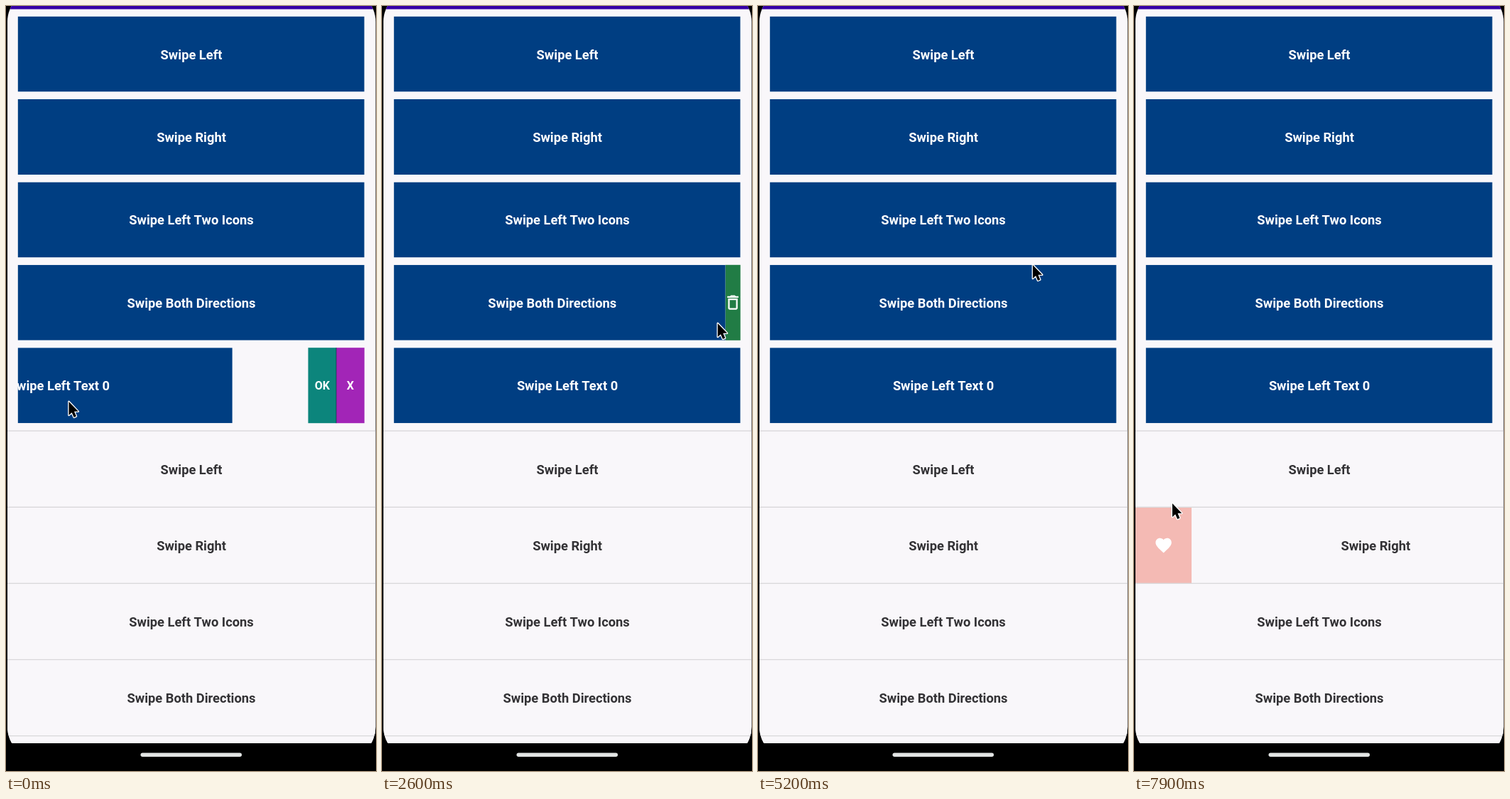
Write an HTML page with a canvas that moves like this. It is 521x1075 px and loops after 8 s.

```html
<!DOCTYPE html>
<html lang="en">
<head>
<meta charset="utf-8">
<title>Swipe rows</title>
<style>
html, body { margin: 0; width: 100%; height: 100%; overflow: hidden; background: #000; }
canvas { display: block; }
</style>
</head>
<body>
<canvas id="stage" width="521" height="1075"></canvas>
<script>
const ctx = document.getElementById('stage').getContext('2d');
const LOOP = 8000, STEP = 100;
const DRAG = 250, SETTLE = 300, CLOSE = 400, GROW_DELAY = 100;
const ACTION_WIDTH = 79.25, CENTER = 261, SCREEN_BOTTOM = 1036;
const PAPER = '#f9f7fa', BLUE = '#003e82', INK = '#333235';

const heartPath = new Path2D('M12 21.35l-1.45-1.32C5.4 15.36 2 12.28 2 8.5 2 5.42 4.42 3 7.5 3c1.74 0 3.41.81 4.5 2.09C13.09 3.81 14.76 3 16.5 3 19.58 3 22 5.42 22 8.5c0 3.78-3.4 6.86-8.55 11.54L12 21.35z');
const binPath = new Path2D('M6 19c0 1.1.9 2 2 2h8c1.1 0 2-.9 2-2V7H6v12zM8 9h8v10H8V9zm7.5-5l-1-1h-5l-1 1H5v2h14V4h-3.5z');
const arrowPath = new Path2D('M0 0V19L4.2 15.2L7.2 22L10.4 20.6L7.5 13.8H13.3Z');

const heart = { color: '#f4bab4', icon: heartPath };
const bin = { color: '#217c45', icon: binPath };
const ok = { color: '#0c857c', label: 'OK' };
const cross = { color: '#a225b7', label: 'X' };

const labels = ['Swipe Left', 'Swipe Right', 'Swipe Left Two Icons', 'Swipe Both Directions', 'Swipe Left Text 0'];
const CARDS = labels.length, ROWS = CARDS * 2;

// The pointer drags a row open from grip, then taps at rest to close it.
const swipes = [
  { row: 4, side: -1, actions: [ok, cross], open: -250, close: 786, overshoot: 0.174,
    grip: { x: 246, y: 555 }, rest: { x: 370, y: 543 } },
  { row: 3, side: 1, actions: [heart], open: 1500, close: 2000,
    grip: { x: 350, y: 440 }, rest: { x: 430, y: 440 } },
  { row: 3, side: -1, actions: [bin], open: 2515, close: 3100,
    grip: { x: 493, y: 445 }, rest: { x: 415, y: 440 } },
  { row: 2, side: -1, actions: [heart, bin], open: 3920, close: 4600,
    grip: { x: 410, y: 278 }, rest: { x: 409, y: 284 } },
  { row: 5, side: -1, actions: [bin], open: 5660, close: 6450,
    grip: { x: 304, y: 643 }, rest: { x: 225, y: 643 } },
  { row: 6, side: 1, actions: [heart], open: 7200, close: 7900,
    grip: { x: 200, y: 760 }, rest: { x: 53, y: 698 } }
];

for (const swipe of swipes) swipe.reach = swipe.side * swipe.actions.length * ACTION_WIDTH;

const stops = swipes.flatMap(({ open, close, grip, rest, reach }) => [
  { time: open, ...grip },
  { time: open + DRAG, x: grip.x + reach, y: grip.y },
  { time: close, ...rest },
  { time: close + CLOSE, ...rest }
]);

function ramp(time, start, duration) {
  const p = Math.min(1, Math.max(0, (time - start) / duration));
  return p * p * (3 - 2 * p);
}

function swipeShift({ open, close, reach, overshoot = 0 }, time) {
  const opened = ramp(time, open, DRAG) - ramp(time, close, CLOSE);
  const extra = overshoot * (1 - ramp(time, open + DRAG, SETTLE));
  return reach * opened * (1 + extra);
}

function pointerAt(time) {
  const next = stops.findIndex(stop => stop.time > time);
  const from = stops[next - 1], to = stops[next];
  const p = ramp(time, from.time, to.time - from.time);
  return [from.x + (to.x - from.x) * p, from.y + (to.y - from.y) * p];
}

function box(x, y, w, h, color) {
  ctx.fillStyle = color;
  ctx.fillRect(x, y, w, h);
}

function clipped(x, y, w, h, paint) {
  ctx.save();
  ctx.beginPath();
  ctx.rect(x, y, w, h);
  ctx.clip();
  paint();
  ctx.restore();
}

function drawLabel(text, x, middle, size, color) {
  ctx.font = `bold ${size}px Roboto, sans-serif`;
  ctx.textAlign = 'center';
  ctx.fillStyle = color;
  ctx.fillText(text, x, middle + size * 0.35);
}

function drawIcon(path, x, y) {
  ctx.save();
  ctx.translate(x, y);
  ctx.scale(1.12, 1.12);
  ctx.translate(-12, -12.1);
  ctx.fillStyle = '#fff';
  ctx.fill(path, 'evenodd');
  ctx.restore();
}

function drawActions(actions, x, y, width, height) {
  actions.forEach((action, i) => {
    const left = x + i * width, middle = y + height / 2;
    box(left, y, width, height, action.color);
    if (i) box(left - 0.5, y, 1, height, 'rgba(0, 30, 50, .6)');
    clipped(left, y, width, height, () => {
      if (action.icon) drawIcon(action.icon, left + width / 2, middle);
      else drawLabel(action.label, left + width / 2, middle + 0.5, 16, '#fff');
    });
  });
}

function drawRow(index, time) {
  const isCard = index < CARDS;
  const left = isCard ? 16.8 : 2, right = isCard ? 504.7 : 520.5;
  const top = isCard ? 14.6 + index * 116.4 : 597.8 + (index - CARDS) * 107.15;
  const height = isCard ? 106 : 106.2;
  if (!isCard) box(left, top - 1.4, right - left, 1.4, '#d9d8da');

  const swipe = swipes.find(s => s.row === index && time > s.open && time < s.close + CLOSE);
  const shift = swipe ? swipeShift(swipe, time) : 0;
  if (swipe) {
    const width = ACTION_WIDTH * ramp(time, swipe.open + GROW_DELAY, SETTLE);
    // Until the panel catches up it still fills a small opening.
    const shown = Math.max(width, Math.min(ACTION_WIDTH / 2, Math.abs(shift)));
    const x = swipe.side > 0 ? left : right - shown * swipe.actions.length;
    drawActions(swipe.actions, x, top, shown, height);
  }

  clipped(left - 1, top, right - left + 1, height, () => {
    const start = Math.max(left, left + shift), end = Math.min(right, right + shift);
    box(start, top, end - start, height, isCard ? BLUE : PAPER);
    if (index < ROWS - 1) {
      drawLabel(labels[index % CARDS], CENTER + shift, top + height / 2 + 0.5, 18.3, isCard ? '#fff' : INK);
    }
  });
}

function drawPointer(x, y) {
  ctx.save();
  ctx.translate(x + 1, y + 1);
  ctx.lineWidth = 2.6;
  ctx.lineJoin = 'round';
  ctx.strokeStyle = '#fff';
  ctx.stroke(arrowPath);
  ctx.fillStyle = '#000';
  ctx.fill(arrowPath);
  ctx.restore();
}

function draw(time) {
  box(0, 0, 521, 1075, '#000');
  ctx.save();
  ctx.beginPath();
  ctx.roundRect(2, -23, 518.5, 1081, 45);
  ctx.clip();
  clipped(0, 0, 521, SCREEN_BOTTOM, () => {
    box(0, 0, 521, SCREEN_BOTTOM, PAPER);
    box(0, 0, 521, 4.5, '#3500a5');
    for (let i = 0; i < ROWS; i++) drawRow(i, time);
  });
  ctx.restore();

  ctx.beginPath();
  ctx.roundRect(189.5, 1049.5, 142.5, 5.5, 2.75);
  ctx.fillStyle = '#e2e5e4';
  ctx.fill();
  drawPointer(...pointerAt(time));
}

function tick() {
  const time = performance.now() % LOOP;
  draw(Math.floor(time / STEP) * STEP);
  requestAnimationFrame(tick);
}
tick();
</script>
</body>
</html>
```
